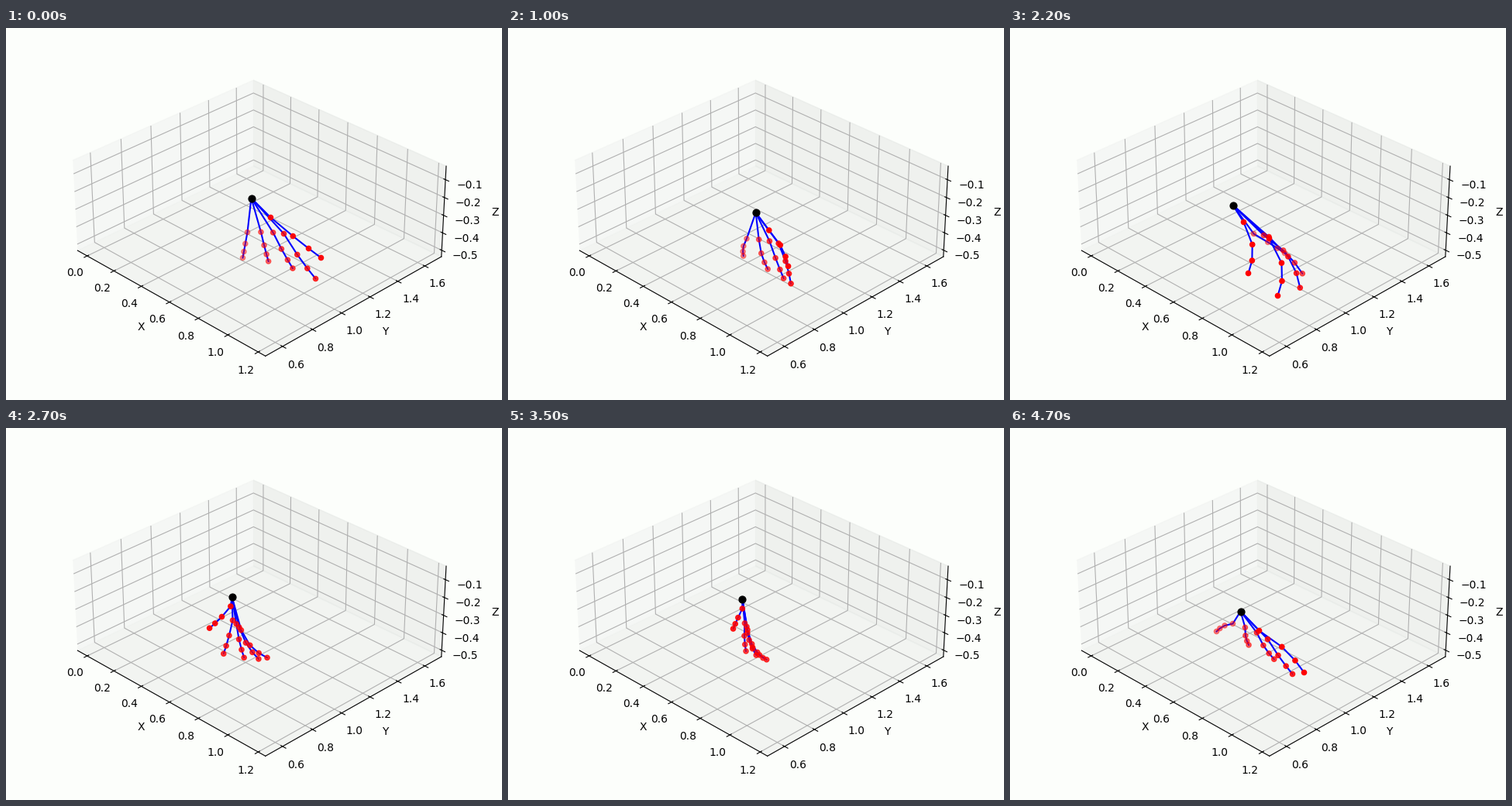
A matplotlib script that plays this animation: 640x480 px, repeating every 4.8 s.

```python
import numpy as np
import matplotlib.pyplot as plt
from matplotlib.animation import FuncAnimation

FRAMES, INTERVAL = 48, 100
W, H = 640, 480
PAPER = "#fcfefb"
JOINTS = np.array([0, 0.45, 0.76, 1])  # spacing of the joints along a finger
SPREAD = np.linspace(0, 1, 4)          # index finger to little finger

# Screen positions are complex numbers, x + iy.
keys = []


def key(frame, wrist, thumb, knuckles, tips, curl, shade):
    """Add a key pose.

    thumb: knuckle, tip; knuckles and tips: arc as index, little, bow;
    curl: thumb, index, little; shade: opacity of index, little.
    """
    keys.append((frame, np.array([wrist, *thumb, *knuckles, *tips, *curl, *shade])))


key(0, wrist=316+219j, thumb=(341+244j, 406+296j),
    knuckles=(358+265j, 311+263j, 2-1j), tips=(399+323j, 305+296j, 2-5j),
    curl=(0.01, 0.02, 0), shade=(0.78, 0.42))
key(6, wrist=320+241j, thumb=(333+263j, 354+324j),
    knuckles=(357+295j, 325+288j, 6+1j), tips=(375+361j, 327+314j, 27+12j),
    curl=(-0.06, -0.03, 0.1), shade=(0.9, 0.42))
key(15, wrist=318+233j, thumb=(341+257j, 371+283j),
    knuckles=(337+253j, 283+248j, -3-4j), tips=(350+285j, 270+265j, -8-3j),
    curl=(-0.09, -0.04, 0.1), shade=(0.7, 0.48))
key(22, wrist=287+228j, thumb=(301+250j, 307+316j),
    knuckles=(334+271j, 314+265j, 7), tips=(345+345j, 354+290j, 29+9j),
    curl=(-0.13, -0.15, -0.01), shade=(1, 0.45))
key(31, wrist=294+210j, thumb=(281+215j, 230+216j),
    knuckles=(262+231j, 295+257j, -3+1j), tips=(234+252j, 324+300j, -6),
    curl=(0.04, 0.08, 0.19), shade=(0.6, 1))
key(40, wrist=313+235j, thumb=(331+257j, 374+318j),
    knuckles=(365+280j, 327+274j, 8-1j), tips=(408+337j, 346+296j, 20+4j),
    curl=(-0.04, -0.03, 0.04), shade=(0.88, 0.42))
key(47, wrist=297+236j, thumb=(321+261j, 379+315j),
    knuckles=(332+272j, 287+252j, 1-2j), tips=(364+317j, 266+262j, 10-1j),
    curl=(-0.06, 0.02, 0.1), shade=(0.84, 0.47))


def pose_at(frame):
    for (t0, a), (t1, b) in zip(keys, keys[1:]):
        if frame <= t1:
            t = (frame - t0) / (t1 - t0)
            return a + (b - a) * t * t * (3 - 2 * t)


def bulge(t):
    return 4 * t * (1 - t)


def across(first, last, bow=0):
    return first + (last - first) * SPREAD + bow * bulge(SPREAD)


def hand_at(frame):
    """Wrist, joints (finger, joint) and the opacity of each finger."""
    p = pose_at(frame)
    start = np.append(p[1], across(*p[3:6]))
    end = np.append(p[2], across(*p[6:9]))
    curl = np.append(p[9], across(*p[10:12]))
    shade = np.append(p[12] + 0.15, across(*p[12:14])).real.clip(0, 1)
    # A curled finger bulges sideways from the line knuckle-tip
    path = JOINTS + 1j * np.outer(curl, bulge(JOINTS))
    return p[0], start[:, None] + (end - start)[:, None] * path, shade


fig = plt.figure(figsize=(W / 100, H / 100), dpi=100, facecolor=PAPER)

# Room with equal scale on all three axes
room = fig.add_axes([0, 0, 1, 1], projection="3d", facecolor=PAPER)
limits = np.array([(-0.073, 1.247), (0.488, 1.725), (-0.537, -0.025)])
room.set(xlim=limits[0], ylim=limits[1], zlim=limits[2],
         xlabel="X", ylabel="Y", zlabel="Z",
         xticks=np.arange(7) * 0.2,
         yticks=0.6 + np.arange(6) * 0.2,
         zticks=-0.5 + np.arange(5) * 0.1)
room.set_box_aspect(np.ptp(limits, axis=1))
room.view_init(elev=30, azim=-45)
for axis, grey in zip((room.xaxis, room.yaxis, room.zaxis), (0.95, 0.9, 0.925)):
    axis.set_pane_color((grey - 0.01, grey, grey - 0.01, 0.5))

# The hand is laid over the room in pixel coordinates
screen = fig.add_axes([0, 0, 1, 1])
screen.axis("off")
screen.set(xlim=(-0.5, W - 0.5), ylim=(H - 0.5, -0.5))
bones = [screen.plot([], [], color="blue", lw=1.5, zorder=2)[0] for _ in range(5)]
dots = screen.scatter(np.zeros(20), np.zeros(20), s=20, color="red", zorder=3)
root = screen.scatter([0], [0], s=40, color="black", zorder=4)


def update(frame):
    wrist, joints, shade = hand_at(frame)
    for bone, chain in zip(bones, joints):
        line = np.append(wrist, chain)
        bone.set_data(line.real, line.imag)
    flat = joints.ravel()
    dots.set_offsets(np.column_stack([flat.real, flat.imag]))
    dots.set_color([(1, 0, 0, a) for a in np.repeat(shade, 4)])
    root.set_offsets([[wrist.real, wrist.imag]])
    return [*bones, dots, root]


anim = FuncAnimation(fig, update, frames=FRAMES, interval=INTERVAL,
                     repeat=True, repeat_delay=0, blit=False)
plt.show()
```
